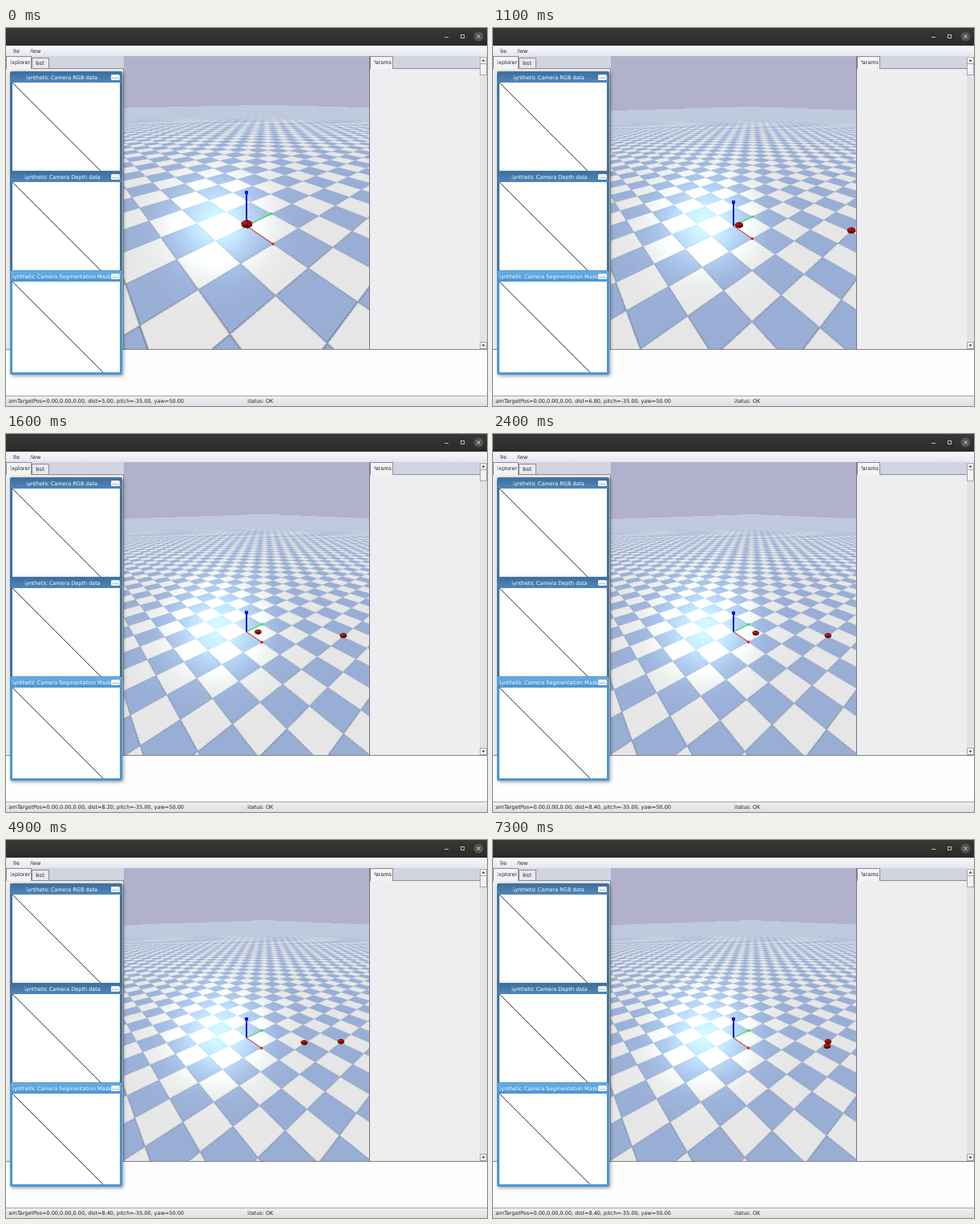
These frames come from a looping animation (600x471 px, 7.4 s). An HTML page with a canvas:

```html
<!DOCTYPE html>
<html lang="en">
<head>
<meta charset="utf-8">
<title>Robot simulation viewer</title>
<style>
html, body { margin: 0; width: 100%; height: 100%; overflow: hidden; }
canvas { display: block; width: 600px; height: 471px; }
</style>
</head>
<body>
<canvas id="stage" width="600" height="471"></canvas>
<script>
const ctx = document.getElementById('stage').getContext('2d');
const LOOP = 7400, TICK = 100;

// Camera: 90 degree vertical field of view, centred on the world origin
const FOCAL = 224.5, CX = 300, CY = 246.5;
const PITCH = 35 * Math.PI / 180, YAW = 50 * Math.PI / 180;
const cp = Math.cos(PITCH), sp = Math.sin(PITCH);
const cy = Math.cos(YAW), sy = Math.sin(YAW);
const VIEW = { x: 147, y: 36, w: 307, h: 364 };

const SKY = [177, 177, 204], WHITE = [230, 230, 231], BLUE = [153, 174, 213];
const GLOW = [58, 76, 66];
const ZOOM = [5.6, 6.2, 6.8, 7.2, 7.4, 7.8, 8, 8.2, 8.4]; // from 900 ms on

function cameraDistance(t) {
  const i = Math.floor(t / TICK) - 9;
  return i < 0 ? 5 : ZOOM[Math.min(i, ZOOM.length - 1)];
}

function project(x, y, z, dist) {
  const right = x * cy + y * sy, ahead = y * cy - x * sy;
  const depth = dist + ahead * cp - z * sp;
  const scale = FOCAL / depth;
  return { x: CX + right * scale, y: CY - (ahead * sp + z * cp) * scale, scale };
}

function groundRow(py, dist) {
  const v = (CY - py) / FOCAL, drop = sp - v * cp;
  const t = dist * sp / drop;
  return { v, drop, t, ahead: t * (cp + v * sp) - dist * cp };
}

// Box-filtered square wave: +1 on even cells, -1 on odd cells
const fold = a => Math.abs(a / 2 - Math.floor(a / 2) - 0.5);
const wave = (a, w) => 2 * (fold(a - w / 2) - fold(a + w / 2)) / w;

function seam(a, w) {
  return Math.abs(a - Math.round(a)) < w / 2 + 0.005 ? Math.min(1, 0.011 / w) : 0;
}

function renderGround(dist) {
  const img = ctx.createImageData(VIEW.w, VIEW.h);
  const gu = -0.155, gv = 0.015, gLen = Math.hypot(gu, gv, 1);
  let k = 0;
  for (let j = 0; j < VIEW.h; j++) {
    const row = groundRow(VIEW.y + j + 0.5, dist), next = groundRow(VIEW.y + j + 1.5, dist);
    const dAhead = next.ahead - row.ahead, dRight = row.t / FOCAL;
    for (let i = 0; i < VIEW.w; i++, k += 4) {
      const u = (VIEW.x + i + 0.5 - CX) / FOCAL, right = row.t * u;
      const x = right * cy - row.ahead * sy, y = right * sy + row.ahead * cy;
      const onPlane = row.drop > 0 && Math.abs(x) < 100 && Math.abs(y) < 100;
      let blue = 0, line = 0, glow = 0;
      if (onPlane) {
        const skew = (next.t - row.t) * u;
        const wx = Math.abs(dRight * cy) + Math.abs(skew * cy - dAhead * sy) + 0.005;
        const wy = Math.abs(dRight * sy) + Math.abs(skew * sy + dAhead * cy) + 0.005;
        blue = 0.5 - 0.5 * wave(x, wx) * wave(y, wy);
        line = 70 * Math.max(seam(x, wx), seam(y, wy));
        const cos = (u * gu + row.v * gv + 1) / (Math.hypot(u, row.v, 1) * gLen);
        glow = cos ** 38;
      }
      for (let c = 0; c < 3; c++) {
        img.data[k + c] = onPlane
          ? WHITE[c] + (BLUE[c] - WHITE[c]) * blue + GLOW[c] * glow - line
          : SKY[c];
      }
      img.data[k + 3] = 255;
    }
  }
  return img;
}

function rect(x, y, w, h, fill) {
  ctx.fillStyle = fill;
  ctx.fillRect(x, y, w, h);
}

function shade(x, y, w, h, top, bottom) {
  const g = ctx.createLinearGradient(0, y, 0, y + h);
  g.addColorStop(0, top);
  g.addColorStop(1, bottom);
  rect(x, y, w, h, g);
}

function line(x1, y1, x2, y2, color, width = 1) {
  ctx.strokeStyle = color;
  ctx.lineWidth = width;
  ctx.beginPath();
  ctx.moveTo(x1, y1);
  ctx.lineTo(x2, y2);
  ctx.stroke();
}

function polygon(color, ...points) {
  ctx.fillStyle = color;
  ctx.beginPath();
  points.forEach(([x, y]) => ctx.lineTo(x, y));
  ctx.fill();
}

// Labels lose the left part of their first letter
function label(text, x, y, color = '#222') {
  ctx.save();
  ctx.beginPath();
  ctx.rect(x + 2.4, y - 8, 300, 16);
  ctx.clip();
  ctx.font = '6.5px "DejaVu Sans", sans-serif';
  ctx.textBaseline = 'alphabetic';
  ctx.fillStyle = color;
  ctx.fillText(text, x, y + 2.5);
  ctx.restore();
}

function drawAxes(dist) {
  const origin = project(0, 0, 0, dist);
  const axis = (x, y, z, color, width, dot) => {
    const end = project(x, y, z, dist);
    line(origin.x, origin.y, end.x, end.y, color, width);
    rect(end.x - dot / 2, end.y - dot / 2, dot, dot, color);
  };
  axis(1, 0, 0, '#e01818', 1, 3);
  axis(0, 1, 0, '#30e040', 1.2, 3);
  axis(0, 0, 1, '#0808c8', 2, 2);
  const tip = project(0, 0, 1, dist);
  rect(tip.x - 2, tip.y - 2, 4, 4, '#1010ff');
}

function drawRobot(x, y, dist) {
  const p = project(x, y, 0.06, dist);
  ctx.save();
  ctx.translate(p.x, p.y);
  ctx.scale(p.scale * 0.01, p.scale * 0.01);
  polygon('#180808', [-14, -2], [-8, -9], [4, -11], [14, -4], [16, 5], [4, 12], [-10, 9]);
  polygon('#a80c0c', [-16, -3], [-5, -10], [5, -7], [12, -9], [17, -1], [9, 5], [1, 2], [-7, 6]);
  polygon('#790808', [-15, 0], [-7, 6], [1, 3], [9, 6], [6, 10], [-4, 8], [-12, 7]);
  polygon('#d42020', [-10, -4], [-4, -7], [1, -4], [-5, -1]);
  ctx.restore();
}

function drawScene(t, dist) {
  ctx.putImageData(ground, VIEW.x, VIEW.y);
  ctx.save();
  ctx.beginPath();
  ctx.rect(VIEW.x, VIEW.y, VIEW.w, VIEW.h);
  ctx.clip();
  drawAxes(dist);
  drawRobot(3, 3, dist);
  const right = 0.62 * Math.max(0, t - 775) / 1000, ahead = -0.175 * right;
  drawRobot(right * cy - ahead * sy, right * sy + ahead * cy, dist);
  ctx.restore();
}

function drawCameraWindow(title, y, h, titleX, active) {
  const [top, bottom, edge] = active
    ? ['#64aee6', '#4a94d2', '#4a96d6'] : ['#3d6f9f', '#4f86b8', '#41759f'];
  ctx.save();
  ctx.shadowColor = 'rgba(0,0,0,.4)';
  ctx.shadowBlur = 4;
  ctx.shadowOffsetX = ctx.shadowOffsetY = 1.5;
  ctx.fillStyle = edge;
  ctx.beginPath();
  ctx.roundRect(5, y, 140, h, 2);
  ctx.fill();
  ctx.restore();
  shade(6, y + 1, 138, 13, top, bottom);
  rect(8, y + 14, 134, h - 17, '#fff');
  line(8, y + 14, 8 + h - 17, y + h - 3, '#222', 0.9);
  label(title, titleX, y + 7.5, '#fff');
  ctx.fillStyle = '#eef2f6';
  ctx.beginPath();
  ctx.roundRect(131, y + 4, 11, 7, 1.5);
  ctx.fill();
  for (let x = 133; x < 140; x += 2) rect(x, y + 8, 1, 1, '#8a97a4');
}

function drawTitleBar() {
  shade(0, 0, 600, 22, '#393837', '#2b2a29');
  line(547, 11.5, 552, 11.5, '#b8b8b4');
  ctx.strokeStyle = '#b8b8b4';
  ctx.strokeRect(567.5, 8.5, 4, 4);
  ctx.fillStyle = '#555452';
  ctx.beginPath();
  ctx.arc(589.5, 10.5, 6, 0, 7);
  ctx.fill();
  line(587.5, 8.5, 591.5, 12.5, '#eee');
  line(591.5, 8.5, 587.5, 12.5, '#eee');
}

function drawTab(text, x, w, active) {
  rect(x, active ? 35 : 37, w, active ? 16 : 13, '#8d8d95');
  rect(x + 1, active ? 36 : 38, w - 2, active ? 15 : 12, active ? '#f3f3f5' : '#e7e7ec');
  label(text, x + 3, active ? 42 : 43);
}

function drawScrollbar() {
  rect(591, 36, 9, 364, '#e3e3e7');
  for (const y of [36, 391]) {
    rect(591, y, 9, 9, '#a5a5ab');
    rect(592, y + 1, 7, 7, '#f6f6f8');
    const s = y === 36 ? -1 : 1;
    polygon('#333', [593.5, y + 4.5 - s], [597.5, y + 4.5 - s], [595.5, y + 4.5 + s * 1.5]);
  }
  rect(591, 44, 9, 15, '#a5a5ab');
  rect(592, 45, 7, 13, '#f3f3f5');
}

function drawInterface(dist) {
  drawTitleBar();
  shade(0, 22, 600, 13, '#fbfbfd', '#e4e5ef');
  label('File', 6, 28);
  label('View', 28, 28);

  rect(0, 35, 147, 366, '#eeeef0');
  rect(0, 35, 147, 15, '#d2d4df');
  rect(0, 50, 147, 1, '#8d8d95');
  rect(146, 50, 1, 350, '#8d8d95');
  rect(147, 35, 307, 1, '#b5b5c6');
  drawTab('Explorer', 0, 32, true);
  drawTab('Test', 32, 22, false);

  rect(453, 35, 147, 366, '#eeeef0');
  rect(454, 35, 137, 15, '#d2d4df');
  rect(454, 50, 137, 1, '#8d8d95');
  rect(453, 35, 1, 365, '#77777f');
  drawTab('Params', 454, 29, true);
  drawScrollbar();

  rect(0, 400, 600, 59, '#fefefe');
  rect(0, 400, 600, 1, '#85858b');
  rect(0, 458, 600, 1, '#a5a5ab');
  shade(0, 459, 600, 12, '#efeff1', '#dfdfe3');
  label(`camTargetPos=0.00,0.00,0.00, dist=${dist.toFixed(2)}, pitch=-35.00, yaw=50.00`, 0, 464);
  label('Status: OK', 299, 464);

  drawCameraWindow('Synthetic Camera RGB data', 54, 127, 23, false);
  drawCameraWindow('Synthetic Camera Depth data', 178, 127, 21, false);
  drawCameraWindow('Synthetic Camera Segmentation Mask', 302, 130, 6, true);
}

let ground, shownDist, shownTick;
function frame(now) {
  const t = Math.floor(now % LOOP / TICK) * TICK;
  if (t !== shownTick) {
    const dist = cameraDistance(t);
    if (dist !== shownDist) ground = renderGround(dist);
    shownDist = dist;
    shownTick = t;
    drawScene(t, dist);
    drawInterface(dist);
  }
  requestAnimationFrame(frame);
}
const start = performance.now();
const loop = () => { frame; };
frame(0);
(function run() {
  requestAnimationFrame(run);
})();
</script>
</body>
</html>
```
